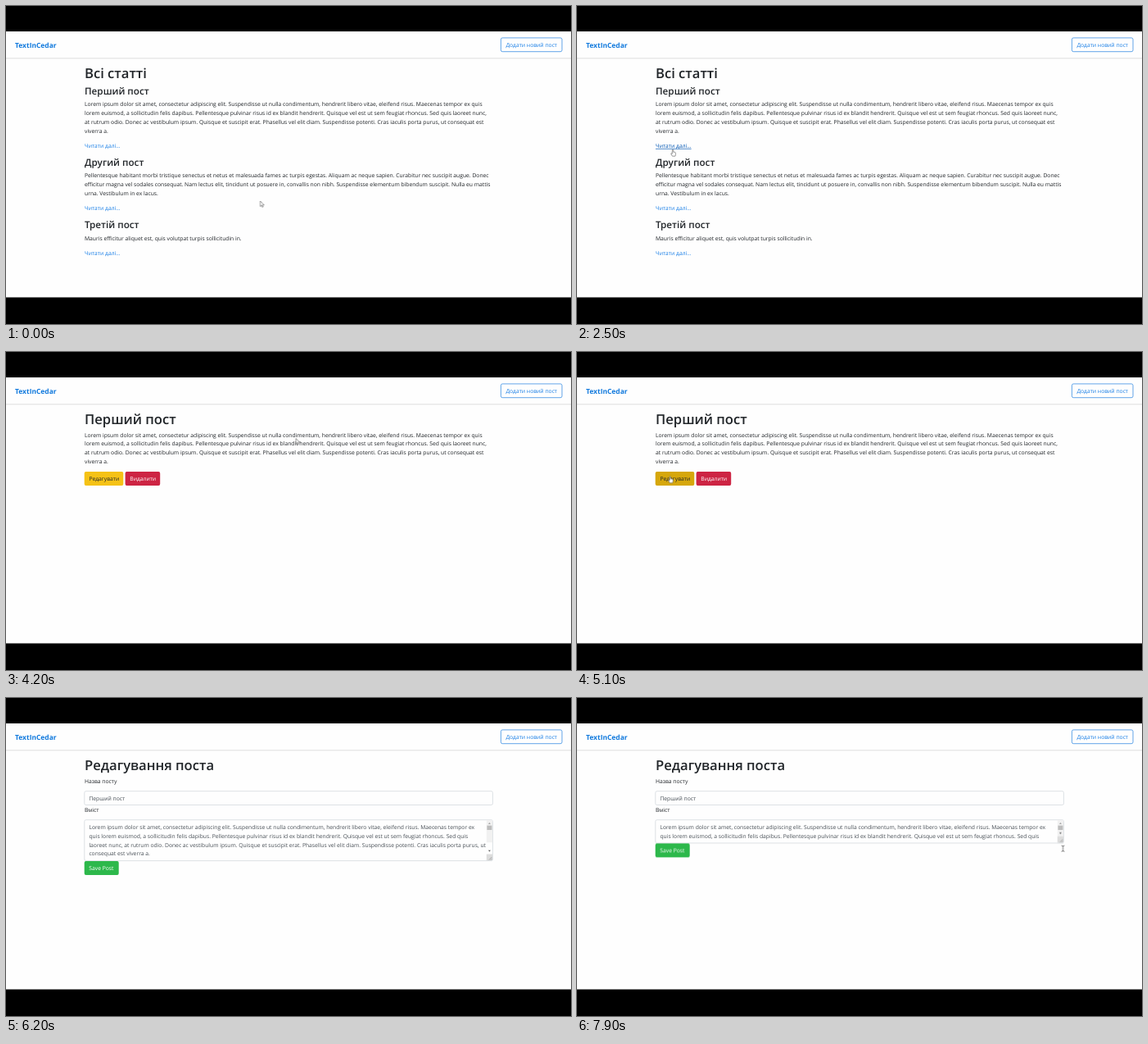
These frames come from a looping animation (690x388 px, 8000 ms). An HTML page:

```html
<!DOCTYPE html>
<html lang="uk">
<head>
<meta charset="utf-8">
<title>Всі статті</title>
<style>
  html, body { margin: 0; width: 100%; height: 100%; overflow: hidden; background: #000; }
  svg { display: block; width: 100%; height: 100%; }
  text { font: 6.76px "Open Sans", sans-serif; fill: #212529; text-rendering: geometricPrecision; white-space: pre; }
  .h1 { font-size: 16.6px; font-weight: 600; }
  .h2 { font-size: 11.7px; font-weight: 600; }
  .brand { font-size: 8.45px; font-weight: 700; fill: #1079dd; }
  .link { fill: #1a7fe6; }
  .on { fill: #fff; }
  .field { fill: #495057; }
  .edge { fill: none; stroke: #ced4da; stroke-width: .7; }

  .list, .post, .form, .arrow, .hand, .beam, .bar { animation: 8s step-end infinite; }
  .list { animation-name: list; }
  .post { animation-name: post; }
  .form { animation-name: form; }
  .bar { animation-name: bar; }
  .arrow { animation-name: arrow; }
  .hand { animation-name: hand; }
  .beam { animation-name: beam; }
  .first { animation: hover 8s step-end infinite; }
  .edit { animation: press 8s linear infinite; }
  .drop { animation: drop 8s linear infinite; }
  .cursor { animation: move 8s linear infinite; }

  @keyframes list { 0% { opacity: 1 } 37.5%, 100% { opacity: 0 } }
  @keyframes post { 0% { opacity: 0 } 37.5% { opacity: 1 } 66.25%, 100% { opacity: 0 } }
  @keyframes form { 0% { opacity: 0 } 66.25%, 100% { opacity: 1 } }
  @keyframes bar { 0% { opacity: 0 } 77.5%, 100% { opacity: 1 } }

  @keyframes hover {
    0% { fill: #1a7fe6; text-decoration: none }
    30%, 100% { fill: #0056b3; text-decoration: underline }
  }
  @keyframes press {
    0%, 60% { fill: #f5c216 }
    62%, 100% { fill: #d6a70c }
  }
  @keyframes drop {
    0%, 75% { transform: translateY(0) }
    78.75%, 94.9% { transform: translateY(-67.2px) }
    95% { transform: translateY(-65px) }
    96.25% { transform: translateY(-66px) }
    97.5%, 100% { transform: translateY(-66.6px) }
  }

  @keyframes arrow {
    0% { opacity: 1 } 26.25% { opacity: 0 } 37.5% { opacity: 1 }
    61.25% { opacity: 0 } 66.25% { opacity: 1 } 71.25% { opacity: 0 }
    82.5% { opacity: 1 } 95%, 100% { opacity: 0 }
  }
  @keyframes hand {
    0% { opacity: 0 } 30% { opacity: 1 } 37.5% { opacity: 0 }
    61.25% { opacity: 1 } 66.25%, 100% { opacity: 0 }
  }
  @keyframes beam { 0% { opacity: 0 } 95%, 100% { opacity: 1 } }

  @keyframes move {
    0% { transform: translate(310.5px, 238px) }
    3.75% { transform: translate(390px, 180px) }
    6.25% { transform: translate(393px, 100px) }
    8.75% { transform: translate(104px, 82px) }
    11.25% { transform: translate(222px, 94px) }
    13.75% { transform: translate(226px, 60px) }
    16.25% { transform: translate(180.5px, 87px) }
    21.25% { transform: translate(164px, 276px) }
    22.5%, 23.5% { transform: translate(169px, 259px) }
    25%, 29.9% { transform: translate(180px, 137px) }
    30%, 33% { transform: translate(117px, 175px) }
    33.75%, 37.4% { transform: translate(117px, 174.6px) }
    37.5% { transform: translate(117.7px, 174px) }
    42.5% { transform: translate(215px, 205px) }
    47.5% { transform: translate(286px, 166px) }
    50%, 51.5% { transform: translate(386px, 100px) }
    60% { transform: translate(118px, 146px) }
    62.5%, 66.2% { transform: translate(113.7px, 151.5px) }
    71.25%, 82.4% { transform: translate(588px, 238px) }
    82.5% { transform: translate(588px, 176px) }
    84.5% { transform: translate(465px, 178px) }
    87.5% { transform: translate(605px, 165px) }
    91.25% { transform: translate(606px, 167px) }
    92.5% { transform: translate(593px, 180px) }
    95%, 100% { transform: translate(593.5px, 180px) }
  }
</style>
</head>
<body>
<svg viewBox="0 0 690 388" preserveAspectRatio="none">
  <defs>
    <linearGradient id="shade" x2="0" y2="1">
      <stop stop-color="#e4e4e4"/>
      <stop offset="1" stop-color="#fefefe"/>
    </linearGradient>
    <text id="lorem">
      <tspan x="96" y="0">Lorem ipsum dolor sit amet, consectetur adipiscing elit. Suspendisse ut nulla condimentum, hendrerit libero vitae, eleifend risus. Maecenas tempor ex quis</tspan>
      <tspan x="96" y="10.85">lorem euismod, a sollicitudin felis dapibus. Pellentesque pulvinar risus id ex blandit hendrerit. Quisque vel est ut sem feugiat rhoncus. Sed quis laoreet nunc,</tspan>
      <tspan x="96" y="21.7">at rutrum odio. Donec ac vestibulum ipsum. Quisque et suscipit erat. Phasellus vel elit diam. Suspendisse potenti. Cras iaculis porta purus, ut consequat est</tspan>
      <tspan x="96" y="32.55">viverra a.</tspan>
    </text>
  </defs>

  <rect y="31" width="690" height="324.5" fill="#fefefe"/>

  <g class="list">
    <text class="h1" x="96" y="88.2">Всі статті</text>
    <text class="h2" x="96" y="108">Перший пост</text>
    <use href="#lorem" y="122.4"/>
    <text class="link first" x="96" y="172.9">Читати далі...</text>
    <text class="h2" x="96" y="195">Другий пост</text>
    <text>
      <tspan x="96" y="209.4">Pellentesque habitant morbi tristique senectus et netus et malesuada fames ac turpis egestas. Aliquam ac neque sapien. Curabitur nec suscipit augue. Donec</tspan>
      <tspan x="96" y="220.25">efficitur magna vel sodales consequat. Nam lectus elit, tincidunt ut posuere in, convallis non nibh. Suspendisse elementum bibendum suscipit. Nulla eu mattis</tspan>
      <tspan x="96" y="231.1">urna. Vestibulum in ex lacus.</tspan>
    </text>
    <text class="link" x="96" y="249">Читати далі...</text>
    <text class="h2" x="96" y="271.1">Третій пост</text>
    <text x="96" y="285.5">Mauris efficitur aliquet est, quis volutpat turpis sollicitudin in.</text>
    <text class="link" x="96" y="303.5">Читати далі...</text>
  </g>

  <g class="post">
    <text class="h1" x="96" y="88.2">Перший пост</text>
    <use href="#lorem" y="103.6"/>
    <rect class="edit" x="95.7" y="146" width="47.6" height="17" rx="1.9"/>
    <text x="101.4" y="157.2">Редагувати</text>
    <rect x="145.6" y="146" width="42.6" height="17" rx="1.9" fill="#cd2443"/>
    <text class="on" x="151.3" y="157.2">Видалити</text>
  </g>

  <g class="form">
    <text class="h1" x="96" y="88.2">Редагування поста</text>
    <text x="96" y="103.7">Назва посту</text>
    <rect class="edge" x="95.8" y="113.7" width="498.6" height="16.8" rx="1.9"/>
    <text class="field" x="101.4" y="124.9">Перший пост</text>
    <text x="96" y="138.7">Вміст</text>
    <path class="edge" d="M95.8 242V150.6a1.9 1.9 0 0 1 1.9-1.9H592.5a1.9 1.9 0 0 1 1.9 1.9V242"/>
    <text class="field">
      <tspan x="101.4" y="159.9">Lorem ipsum dolor sit amet, consectetur adipiscing elit. Suspendisse ut nulla condimentum, hendrerit libero vitae, eleifend risus. Maecenas tempor ex</tspan>
      <tspan x="101.4" y="170.7">quis lorem euismod, a sollicitudin felis dapibus. Pellentesque pulvinar risus id ex blandit hendrerit. Quisque vel est ut sem feugiat rhoncus. Sed quis</tspan>
      <tspan x="101.4" y="181.6">laoreet nunc, at rutrum odio. Donec ac vestibulum ipsum. Quisque et suscipit erat. Phasellus vel elit diam. Suspendisse potenti. Cras iaculis porta purus, ut</tspan>
      <tspan x="101.4" y="192.4">consequat est viverra a.</tspan>
    </text>
    <g class="bar">
      <rect x="586.8" y="149.2" width="7.2" height="27" fill="#f1f1f1"/>
      <path d="M588.9 153.7l1.5-1.7 1.5 1.7z" fill="#999"/>
      <rect x="587.4" y="155.6" width="6" height="5.4" fill="#bdbdbd"/>
    </g>
    <g class="drop">
      <rect x="94" y="242" width="503" height="105" fill="#fefefe"/>
      <g class="bar">
        <rect x="586.8" y="235.5" width="7.2" height="7.8" fill="#dcdcdc"/>
        <path d="M588.9 230.8l1.5 1.7 1.5-1.7z" fill="#505050"/>
      </g>
      <path class="edge" d="M95.8 241.7a1.9 1.9 0 0 0 1.9 1.9H592.5a1.9 1.9 0 0 0 1.9-1.9"/>
      <path d="M589.8 242.6l3.6-3.6M591.8 242.6l1.6-1.6" stroke="#777" stroke-width=".5"/>
      <rect x="95.7" y="244" width="42" height="17" rx="1.9" fill="#2db84b"/>
      <text class="on" x="101.3" y="255.1">Save Post</text>
    </g>
  </g>

  <rect y="31" width="690" height="32" fill="#fefefe"/>
  <rect y="63" width="690" height="2.6" fill="url(#shade)"/>
  <text class="brand" x="11" y="50.5">TextInCedar</text>
  <rect x="604.4" y="38.9" width="74.6" height="16.8" rx="1.9" fill="none" stroke="#3a8fe4" stroke-width=".8"/>
  <text class="link" x="610.4" y="50">Додати новий пост</text>

  <g class="cursor" stroke="#333" stroke-width=".5" fill="#fff" stroke-linejoin="round">
    <path class="arrow" d="M0 0V6.6L1.5 5.2 2.5 7.5 3.6 7 2.6 4.8H4.7Z"/>
    <path class="hand" d="M-.7 .6Q0-.5 .7 .6V3.2Q2.9 3 3.7 4.2V6.2L2.9 8.2H-.5L-2.4 5.2Q-2.4 4.2-.7 5.2Z"/>
    <path class="beam" fill="none" stroke="#222" stroke-width=".6" d="M-1.8 0Q0 .2 0 1.4Q0 .2 1.8 0M0 1.4V6M-1.8 7.4Q0 7.2 0 6Q0 7.2 1.8 7.4"/>
  </g>
</svg>
</body>
</html>
```
